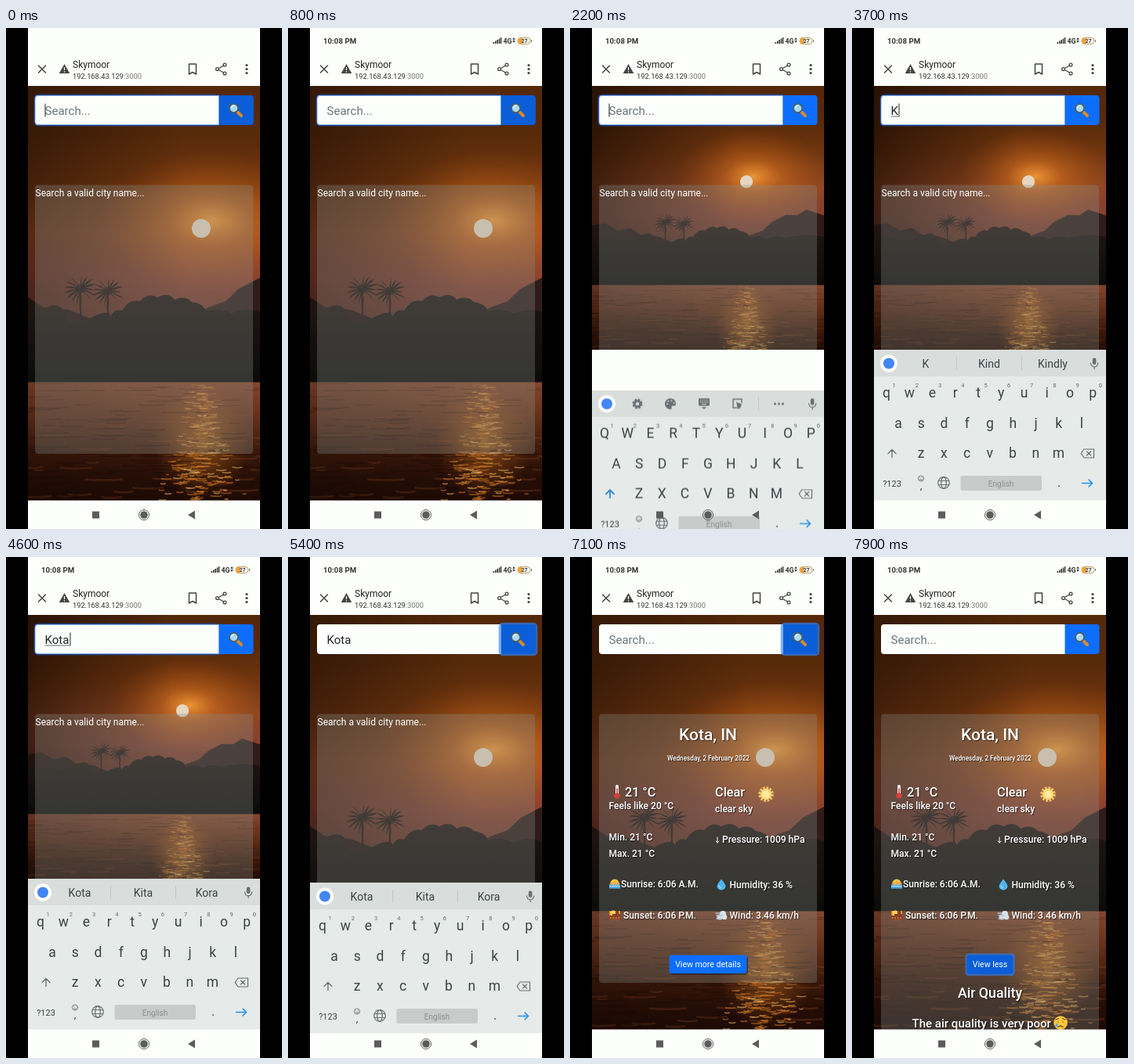
An HTML page that plays this animation: 352 by 640 pixels, repeating every 8000 ms.

```html
<!DOCTYPE html>
<html lang="en">
<head>
<meta charset="utf-8">
<title>Weather search</title>
<style>
html, body { margin: 0; width: 100%; height: 100%; overflow: hidden; background: #000; }
svg { display: block; }
#stage { width: 100vw; height: 100vh; }
text { font-family: Roboto, "Noto Sans", sans-serif; white-space: pre; }
.mid { text-anchor: middle; }
.line { fill: none; stroke: currentColor; stroke-linecap: round; stroke-linejoin: round; }
.paper { fill: #fcfffb; }
.field { font-size: 15.06px; fill: #212529; }
.result text { fill: #fff; font-size: 12.05px; font-weight: 500; text-shadow: 1px 1px 1px #0009; }
.result .big { font-size: 16.3px; }
.result .btn { font-size: 10.55px; font-weight: 400; text-shadow: none; }
.keys text, .tips { fill: #3c4245; text-anchor: middle; }
.tips text { font-size: 14px; }
#photo { transform-origin: 176px 74px; animation: zoom 8s step-end infinite; }
#keyboard { animation: slide 8s linear infinite; }
@keyframes zoom {
  0%, 66.875% { transform: none; }
  26.875% { transform: scale(.672); }
}
@keyframes slide {
  0%, 26.25% { transform: translateY(229px); }
  27.5% { transform: translateY(52px); }
  28.75% { transform: translateY(9px); }
  30%, 66.9% { transform: none; }
  67.5% { transform: translateY(4.5px); }
  68.75% { transform: translateY(44px); }
  70% { transform: translateY(130px); }
  71.25%, 100% { transform: translateY(229px); }
}
</style>
</head>
<body>
<svg id="stage" viewBox="0 0 352 640">
<defs>
  <linearGradient id="sky" x1="0" y1="0" x2="0" y2="1">
    <stop offset="0" stop-color="#54290a"/><stop offset=".16" stop-color="#572a0a"/>
    <stop offset=".33" stop-color="#6f350f"/><stop offset=".5" stop-color="#8c4522"/>
    <stop offset=".64" stop-color="#87402e"/><stop offset=".8" stop-color="#6b352b"/>
    <stop offset="1" stop-color="#3c221e"/>
  </linearGradient>
  <radialGradient id="glow">
    <stop offset="0" stop-color="#ffa43a" stop-opacity=".85"/>
    <stop offset=".35" stop-color="#e87c20" stop-opacity=".45"/>
    <stop offset="1" stop-color="#c0540e" stop-opacity="0"/>
  </radialGradient>
  <linearGradient id="shade">
    <stop offset="0" stop-color="#0c0402" stop-opacity=".6"/>
    <stop offset=".62" stop-color="#0c0402" stop-opacity="0"/>
  </linearGradient>
  <linearGradient id="shore" x1="0" y1="0" x2="0" y2="1">
    <stop offset="0" stop-color="#1f1512"/><stop offset="1" stop-color="#0c0b09"/>
  </linearGradient>
  <linearGradient id="sea" x1="0" y1="0" x2="0" y2="1">
    <stop offset="0" stop-color="#84452d"/><stop offset=".25" stop-color="#643019"/>
    <stop offset=".5" stop-color="#3c190b"/><stop offset=".7" stop-color="#260e06"/>
    <stop offset="1" stop-color="#170704"/>
  </linearGradient>
  <radialGradient id="shine">
    <stop offset="0" stop-color="#e08a2c" stop-opacity=".5"/><stop offset="1" stop-color="#c06414" stop-opacity="0"/>
  </radialGradient>
  <clipPath id="page"><path d="M28 74h296v530H28z"/></clipPath>
  <g id="palm" fill="#1c1311">
    <path fill="none" stroke="#1c1311" stroke-width="2.200" d="M0 0Q-1 20 1 42"/>
    <g id="fronds"></g>
  </g>
  <g id="lens">
    <path stroke="#d98a2b" stroke-width="4" stroke-linecap="round" d="M295.500 107.500l4.500 4.500"/>
    <circle cx="290.500" cy="102.500" r="5.600" fill="#a9d9f2" stroke="#4b5d68" stroke-width="1.800"/>
    <path class="line" color="#fff" d="M287.500 102q.5-2.500 3-3"/>
  </g>
  <g id="sunIcon">
    <circle r="8.300" fill="none" stroke="#f3c064" stroke-width="3" stroke-dasharray="2.800 1.550"/>
    <circle r="7.200" fill="#f8d978"/><circle r="4.500" fill="#ffeaa0"/>
  </g>
</defs>

<!-- web page -->
<g clip-path="url(#page)">
  <g id="photo">
    <path fill="url(#sky)" d="M-50 74h452v380H-50z"/>
    <ellipse cx="262" cy="246" rx="150" ry="90" fill="url(#glow)"/>
    <path fill="url(#shade)" d="M-50 74h452v380H-50z"/>
    <circle cx="249" cy="256" r="12" fill="#e6d6c2"/>
    <path fill="#2f1c18" d="M230 372L258 357 280 349 297 333 324 319 345 320 362 309 402 322V400H230z"/>
    <path fill="#1f1310" d="M-50 340L-20 335 5 349 28 344 48 357 80 360 110 372V410H-50z"/>
    <path fill="url(#shore)" d="M-50 368Q-20 358 0 366T45 360 75 366 105 372 134 368Q138 358 148 361 157 345 171 349 181 337 193 344 207 337 215 347 228 341 237 350 250 351 256 362 275 357 287 365 307 356 324 363 360 352 402 362V455H-50z"/>
    <use href="#palm" x="95" y="333"/>
    <use href="#palm" transform="translate(130 336) scale(.95)"/>
    <path fill="url(#sea)" d="M-50 452.500h452v175H-50z"/>
    <ellipse cx="250" cy="528" rx="62" ry="75" fill="url(#shine)"/>
    <g id="ripples" fill="none"></g>
    <path fill="url(#shade)" opacity=".5" d="M-50 452.500h452v175H-50z"/>
  </g>

  <rect x="37" y="200.500" width="278" height="343.500" rx="4" fill="#8a908a" fill-opacity=".32" data-on="0-7400"/>
  <rect x="37" y="200.500" width="278" height="430" rx="4" fill="#8a908a" fill-opacity=".32" data-on="7400-8000"/>
  <text x="37.500" y="214.500" font-size="12.050" fill="#fff" data-on="0-5900">Search a valid city name...</text>

  <g class="result" data-on="5900-8000">
    <text class="mid" x="176" y="234" style="font-size:21px">Kota, IN</text>
    <text class="mid" x="176.500" y="260" style="font-size:8.200px">Wednesday, 2 February 2022</text>
    <path class="line" color="#e8eef0" stroke-width="4" d="M60 293v12"/>
    <circle cx="60" cy="305" r="3.600" fill="#d9403a"/>
    <path class="line" color="#d9403a" stroke-width="1.600" d="M60 296v9"/>
    <text class="big" x="70" y="306">21 °C</text>
    <text x="49.500" y="322">Feels like 20 °C</text>
    <text x="49.500" y="361.500">Min. 21 °C</text>
    <text x="49.500" y="382.500">Max. 21 °C</text>
    <text class="big" x="185" y="306">Clear</text>
    <use href="#sunIcon" x="250" y="303"/>
    <text x="185" y="326">clear sky</text>
    <path class="line" color="#fff" d="M188 358v7m-1.800-2l1.800 2 1.800-2"/>
    <text x="194" y="365">Pressure: 1009 hPa</text>
    <circle cx="57" cy="417" r="5.500" fill="#ffc83d"/>
    <path fill="#f2a850" d="M50 418l3-3 2 2 2-5 2 5 3-2 2 3z"/>
    <path fill="#5aaade" d="M50 418.500h14v5H50z"/>
    <path class="line" color="#a8dcf5" d="M51 420.500h12"/>
    <text x="65" y="422">Sunrise: 6:06 A.M.</text>
    <path fill="#f0892e" d="M50 452h14v11.500H50z"/>
    <circle cx="55" cy="455" r="3.500" fill="#ffd34f"/>
    <path fill="#8a3f28" d="M50 458h4v-2h4v-4h4v4h2v7.500H50z"/>
    <path stroke="#ffcf4a" stroke-dasharray="1.500 2" d="M51 461h13"/>
    <text x="68" y="461.500">Sunset: 6:06 P.M.</text>
    <path fill="#4fb4ee" d="M193 411.500Q187.500 418 187.500 420.500a5.500 5 0 0 0 11 0Q198.500 418 193 411.500z"/>
    <path class="line" color="#c9ecff" d="M190 420q.5 2.500 2.500 3"/>
    <text x="203.500" y="423">Humidity: 36 %</text>
    <g fill="#d8e3ea"><circle cx="195" cy="456" r="4"/><circle cx="197" cy="460" r="3.300"/><circle cx="191" cy="460" r="3.500"/></g>
    <path class="line" color="#b2c4cf" stroke-width="1.300" d="M186 455h5m-4 3h7m-7 4h6"/>
    <text x="203.500" y="462">Wind: 3.46 km/h</text>
    <g data-on="0-7400">
      <rect x="128" y="510.500" width="99" height="23" rx="3" fill="#000" opacity=".45"/>
      <rect x="126.500" y="508.500" width="99" height="23.500" rx="3" fill="#0d6efd"/>
      <text class="mid btn" x="176" y="524.300">View more details</text>
    </g>
    <g data-on="7400-8000">
      <rect x="144.500" y="506.500" width="63" height="28.500" rx="4" fill="#3184fd" opacity=".6"/>
      <rect x="146.500" y="508.500" width="59" height="24" rx="3" fill="#0b5ed7"/>
      <text class="mid btn" x="176" y="524.300">View less</text>
      <text class="mid" x="176" y="563" style="font-size:17.700px">Air Quality</text>
      <text x="76.500" y="601" style="font-size:15.060px">The air quality is very poor</text>
      <circle cx="266" cy="595" r="8.800" fill="#ffc83d"/>
      <path class="line" color="#6b4216" stroke-width="1.200" d="M260 591l3.500-1.500m5 0l3.500 1.500M262.500 594h.5m6 0h.5M263 600.500q3-3 6 0"/>
      <path fill="#4ba7ee" d="M261 595q-3.500 5 0 5.500 3-.5 0-5.500z"/>
    </g>
  </g>

  <!-- search bar -->
  <rect x="35.500" y="84.500" width="238" height="41" rx="5.500" fill="#0d56cc" fill-opacity=".55" data-on="0-5200"/>
  <path fill="#0d6efd" d="M271 86h40.500a4 4 0 0 1 4 4v30a4 4 0 0 1-4 4H271z"/>
  <path fill="#0b5ed7" data-on="0-2150 5200-7400" d="M271 86h40.500a4 4 0 0 1 4 4v30a4 4 0 0 1-4 4H271z"/>
  <path class="paper" d="M271.500 86H41a4 4 0 0 0-4 4v30a4 4 0 0 0 4 4H271.500z"/>
  <path fill="none" stroke="#5c92e8" stroke-width=".8" data-on="0-5200" d="M271.500 86.400H41a4 4 0 0 0-4 4v29.200a4 4 0 0 0 4 4H271.500z"/>
  <rect x="270" y="85" width="47" height="40" rx="4" fill="none" stroke="#3184fd" stroke-opacity=".65" stroke-width="2.600" data-on="5200-7400"/>
  <use href="#lens"/>
  <text class="field" x="49.500" y="110.500" style="fill:#6c757d" data-on="0-3500 5900-8000">Search...</text>
  <g id="typed"></g>
  <path class="paper" d="M28 411h296v193H28z" data-on="2150-5350"/>
</g>

<!-- browser and system bars -->
<path class="paper" d="M28 0h296v74H28zM28 603.500h296V640H28z"/>
<g data-on="600-8000" fill="#333">
  <text x="45" y="20" font-size="9.700" font-weight="700">10:08 PM</text>
  <path d="M261.500 18h1.600v2h-1.600zM264 16.500h1.600V20H264zM266.400 15h1.600v5h-1.600zM268.800 13.500h1.600V20h-1.600zM271 12h1.300v8H271z"/>
  <text x="274.500" y="20" font-size="8.800" font-weight="700">4G</text>
  <path class="line" stroke-width=".8" d="M288 13v5m-1.200-3.800L288 13l1.200 1.200m-2.400 2.600L288 18l1.200-1.200"/>
  <rect x="293" y="12.500" width="16" height="8" rx="3.800" fill="#fffdf4" stroke="#b59a62"/>
  <path fill="#f2a43a" d="M296.800 12.500h1.700v8h-1.700a4 4 0 0 1 0-8z"/>
  <path d="M310 15h1v3h-1z" fill="#777"/>
  <text class="mid" x="301.500" y="19.200" font-size="7" font-weight="700">27</text>
</g>
<g color="#444">
  <path class="line" stroke-width="1.500" d="M41.500 48l9 9m0-9l-9 9"/>
  <path fill="#444" d="M74.500 46l6.800 12H67.700z"/><path stroke="#fff" stroke-width="1.200" d="M74.500 50v4m0 1.300v1.400"/>
  <text x="85" y="51" font-size="12" fill="#222">Skymoor</text>
  <text x="85" y="64.500" font-size="9.300" fill="#333">192.168.43.129<tspan fill="#777">:3000</tspan></text>
  <path class="line" stroke-width="1.500" d="M233.500 46h9v13l-4.500-2.500-4.500 2.500z"/>
  <path class="line" stroke-width="1.300" d="M278.500 47.500l-9 5 9 5"/>
  <g fill="#fff" stroke="#444" stroke-width="1.300"><circle cx="279" cy="47" r="1.900"/><circle cx="269.500" cy="52.500" r="1.900"/><circle cx="279" cy="58" r="1.900"/></g>
  <g fill="#444"><circle cx="307" cy="47.500" r="1.600"/><circle cx="307" cy="52.500" r="1.600"/><circle cx="307" cy="57.500" r="1.600"/></g>
</g>

<!-- on-screen keyboard -->
<g id="keyboard" color="#6a6f72">
  <path fill="#e6eae8" d="M28 411h296v192.500H28z"/>
  <path fill="#d9dddb" d="M28 411h296v34H28z"/>
  <circle cx="47" cy="428.500" r="11" fill="#fff"/>
  <circle cx="47" cy="428.500" r="7" fill="#4285f4"/>
  <g data-on="0-3500" fill="#6a6f72">
    <circle cx="86" cy="428.500" r="5.300" fill="none" stroke="#6a6f72" stroke-width="2.400" stroke-dasharray="2.700 1.460"/>
    <circle cx="86" cy="428.500" r="3.600" fill="none" stroke="#6a6f72" stroke-width="2.600"/>
    <path d="M128 421.500a7 7 0 1 0 0 14q2 0 1.500-2.500t2-2h2q2-1 1.500-3.500-1-6-7-6z"/>
    <path stroke="#d9dddb" stroke-width="2" stroke-linecap="round" d="M124 428.500h0m1.500-3.500h0m4-.5h0m3 3h0"/>
    <rect x="164" y="421.500" width="14" height="9.500" rx="1"/>
    <path stroke="#d9dddb" stroke-dasharray="1.400 1.200" d="M166 424h11m-11 2.500h11"/><path stroke="#d9dddb" d="M168 429h6"/>
    <path d="M168 432.500h6l-3 3z"/>
    <path class="line" stroke-width="1.400" d="M219 427v-4.500h-11v11h5"/><path d="M212 426l7 3-2 5-3 1z"/>
    <path fill="#c2c7c5" d="M240 420h1v17h-1z"/>
    <circle cx="261.500" cy="428.500" r="1.500"/><circle cx="266.500" cy="428.500" r="1.500"/><circle cx="271.500" cy="428.500" r="1.500"/>
  </g>
  <g id="tips" class="tips"></g>
  <rect x="306.800" y="421.500" width="4.600" height="8.500" rx="2.300" fill="#6a6f72"/>
  <path class="line" stroke-width="1.200" d="M304.500 428q.5 4.800 4.600 4.800t4.600-4.800m-4.600 5v2.500"/>
  <g id="keys" class="keys"></g>
  <path class="line" stroke-width="1.300" d="M51 548.500v-10m-5 5l5-5 5 5"/>
  <path class="line" color="#2492ee" stroke-width="1.500" data-on="0-3500" d="M51 548.500v-10m-5 5l5-5 5 5"/>
  <path class="line" stroke-width="1.200" d="M292 543.500l4-5.500h12.500v11H296zM299.500 541l5 5m0-5l-5 5"/>
  <g class="keys">
    <text x="51" y="585.500" font-size="11">?123</text>
    <text x="88" y="588.500" font-size="13">,</text>
    <text x="264" y="586" font-size="16">.</text>
  </g>
  <circle class="line" cx="88" cy="575.500" r="3.600" stroke-width=".9"/>
  <path class="line" stroke-width=".9" d="M86.700 574.500h0m2.600 0h0M86.300 576.700q1.700 1.700 3.400 0"/>
  <g class="line" stroke-width="1.200"><circle cx="117" cy="581" r="7.300"/><ellipse cx="117" cy="581" rx="3.300" ry="7.300"/><path d="M110.500 578.500h13m-13 5h13"/></g>
  <rect x="138.500" y="572" width="103.500" height="19" rx="2" fill="#c7cbc9"/>
  <text class="mid" x="190" y="585.500" font-size="10" fill="#8b908e">English</text>
  <path class="line" color="#2492ee" stroke-width="1.500" d="M293.500 581.500h13m-4.500-4.500l4.500 4.500-4.500 4.500"/>
</g>

<g fill="#5c5c5c">
  <path d="M110 617.500h9v9h-9zM232 622l9-5.500v11z"/>
  <circle cx="176" cy="622" r="4.800"/><circle cx="176" cy="622" r="6.500" fill="none" stroke="#5c5c5c" stroke-width="1"/>
</g>
<path d="M0 0h28v640H0zM324 0h28v640h-28z"/>
</svg>

<script>
const LOOP = 8000;
const $ = id => document.getElementById(id);
const label = (x, y, size, str, extra = '') =>
  `<text x="${x}" y="${y}" font-size="${size}" ${extra}>${str}</text>`;

// Letters, with small digits over the top row
const rows = [['qwertyuiop', 44, 471.5], ['asdfghjkl', 59, 510.5], ['zxcvbnm', 88, 549]];
const letters = change => rows.map(([chars, x, y]) =>
  [...chars].map((c, i) => label(x + i * 29.25, y, 17.5, change(c))).join('')).join('');
$('keys').innerHTML =
  `<g data-on="0-3500">${letters(c => c.toUpperCase())}</g>` +
  `<g data-on="3500-8000">${letters(c => c)}</g>` +
  [...'1234567890'].map((d, i) => label(53.5 + i * 29.25, 458.5, 7.5, d, 'opacity=".75"')).join('');

// Typing: text, start, end, caret position, suggestions
const caret = (x, on) => `<path fill="#222" d="M${x} 96.500h1v17h-1z" data-on="${on}"/>`;
const steps = [
  ['K', 3500, 4000, 59.5, ['K', 'Kind', 'Kindly']],
  ['Ko', 4000, 4300, 68, ['Ko', 'Kota', 'Kolar']],
  ['Kot', 4300, 4600, 73, ['Kot', 'Kota', 'Koto']],
  ['Kota', 4600, 5900, 81.5, ['Kota', 'Kita', 'Kora']],
];
$('typed').innerHTML = caret(49.5, '0-500 1000-1500 2000-2500 3000-3500') +
  steps.map(([str, from, to, x]) => {
    const blurAt = Math.min(to, 5200);
    return label(49.5, 110.5, 15.06, str, `class="field" data-on="${from}-${to}"`) +
      `<path stroke="#444" stroke-width=".8" d="M49.500 113H${x}" data-on="${from}-${blurAt}"/>` +
      caret(x, `${from}-${Math.min(blurAt, from + 500)}`);
  }).join('');
$('tips').innerHTML = steps.map(([, from, to, , words]) =>
  `<g data-on="${from}-${to}">` + words.map((w, i) => label(94 + i * 81, 434, 14, w)).join('') +
  '<path stroke="#c2c7c5" d="M133.500 420v17m83-17v17"/></g>').join('');

let seed = 7;
const rnd = () => (seed = seed * 16807 % 2147483647) / 2147483647;

// Palm crown: tapered fronds whose tips droop
let fronds = '';
for (let i = 0; i < 17; i++) {
  const angle = i / 17 * 2 * Math.PI;
  const length = 18 + rnd() * 5;
  const x = Math.cos(angle) * length, y = Math.sin(angle) * length + 2;
  const at = n => n.toFixed(1);
  fronds += `M0 0Q${at(x * .5 - 1)} ${at(y * .5 - 4)} ${at(x)} ${at(y)}Q${at(x * .5 + 1)} ${at(y * .5 + 1)} 0 0`;
}
$('fronds').innerHTML = `<path d="${fronds}"/><circle r="6" opacity=".7"/>`;

// Waves: dark streaks everywhere, golden ones below the sun
const streak = (x, y, w, color, alpha, h) =>
  `<path stroke="${color}" stroke-opacity="${alpha}" stroke-width="${h}" d="M${(x - w / 2).toFixed(1)} ${y.toFixed(1)}q${(w / 2).toFixed(1)} ${h} ${w.toFixed(1)} 0"/>`;
let waves = '';
for (let i = 0; i < 240; i++) {
  const depth = rnd();
  const color = rnd() < .7 ? '#170704' : '#8a4420';
  waves += streak(-50 + rnd() * 452, 454 + depth * 165, 12 + rnd() * 40, color, .32, .7 + depth * 2.2);
}
for (let i = 0; i < 260; i++) {
  const depth = rnd();
  const spread = 22 + depth * depth * 50;
  waves += streak(249 + (rnd() + rnd() - 1) * spread, 455 + depth * 148, 3 + rnd() * 12,
    rnd() < .3 ? '#f0b860' : '#cc7420', .55, .8 + depth);
}
$('ripples').innerHTML = waves;

// Each data-on list of "from-to" times in ms becomes a stepped keyframe rule
const names = new Map();
let css = '';
for (const el of document.querySelectorAll('[data-on]')) {
  const spans = el.dataset.on;
  if (!names.has(spans)) {
    names.set(spans, 'on' + names.size);
    const frames = spans.split(' ').map(span => {
      const [from, to] = span.split('-').map(ms => ms / LOOP * 100);
      return `${from}%{opacity:1}${to}%{opacity:0}`;
    }).join('');
    css += `@keyframes ${names.get(spans)}{0%{opacity:0}${frames}}`;
  }
  el.style.animation = `${names.get(spans)} ${LOOP}ms step-end infinite`;
}
document.head.appendChild(document.createElement('style')).textContent = css;
</script>
</body>
</html>
```
